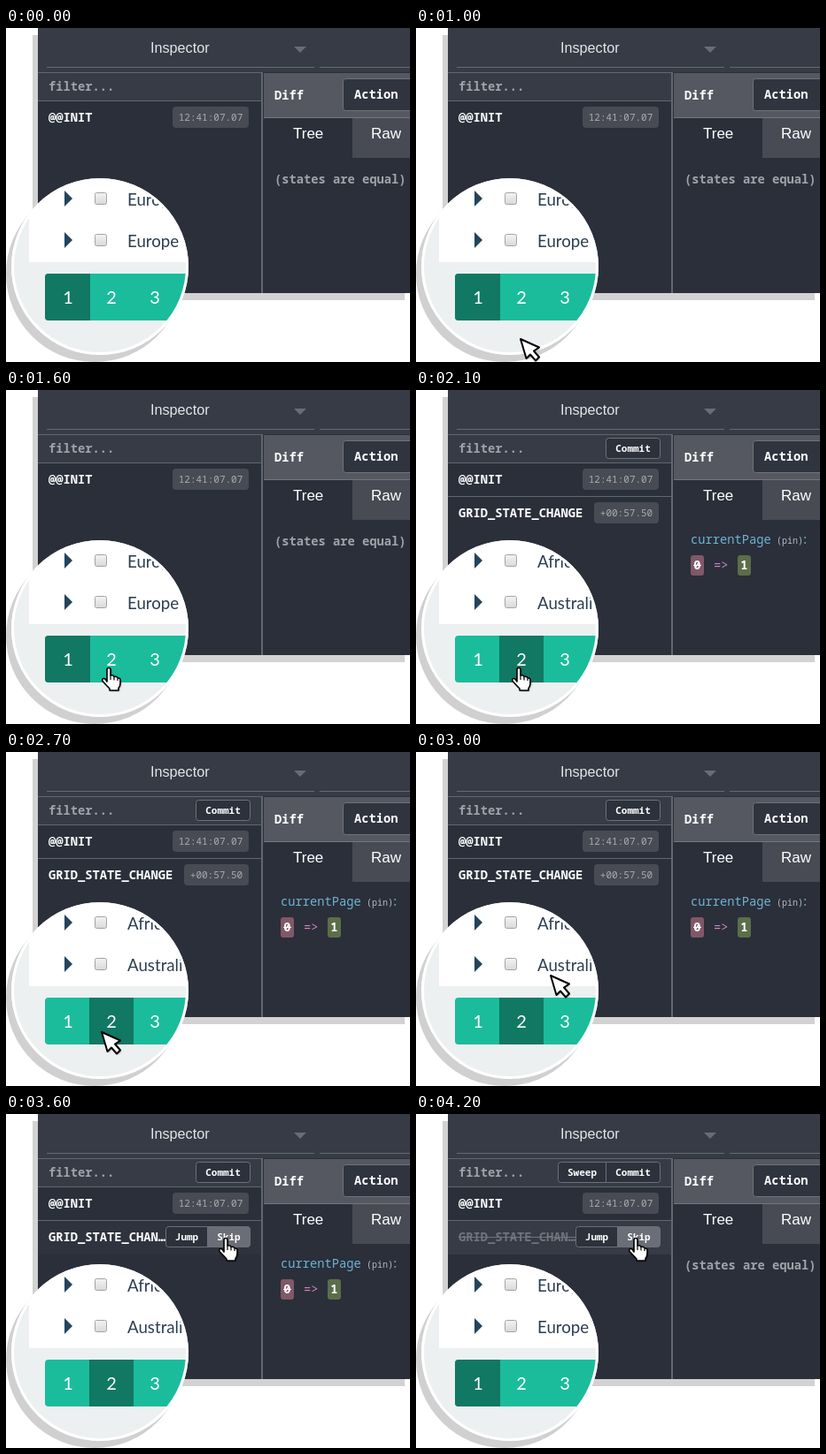
Animation, 456 px wide and 378 px high, one loop 5.2 s. Source, as an HTML page with a canvas:

```html
<!DOCTYPE html>
<html lang="en">
<head>
<meta charset="utf-8">
<title>State inspector demo</title>
<style>
  html, body { margin: 0; width: 100%; height: 100%; overflow: hidden; background: #fff; }
  canvas { display: block; }
</style>
</head>
<body>
<canvas id="stage" width="456" height="378"></canvas>
<script>
const ctx = document.getElementById('stage').getContext('2d');
const LOOP = 5200, STEP = 100;
const MONO = '"Noto Sans Mono", "DejaVu Sans Mono", monospace';
const SANS = '"Liberation Sans", Arial, sans-serif';
const LATO = 'Lato, sans-serif';
const BODY = `600 13.75px ${MONO}`;
const SMALL = `600 11px ${MONO}`;
const DARK = '#2a2f3a', HEADER = '#363b46', LINE = '#62666e', BADGE = '#484b54';

const ARROW = new Path2D('M1 1 L7.5 23 L12 18.5 L18 25.5 L22 21.5 L16 14.5 L22 10.5 Z');
const HAND = new Path2D('M7 17 V3.5 Q7 1.5 9 1.5 T11 3.5 V10 Q14 9 15 11.5 Q18 10.5 19 13 ' +
  'Q22 12.5 22 15.5 V19 Q22 22 20 24.5 V27 H10 V25 Q7 22 2 16.5 Q1 13.5 3.5 13.5 Q5 13.5 7 17 Z');
const KNUCKLES = new Path2D('M11 10 V15 M15 12 V15.5 M19 13.5 V16');

// Pointer waypoints: time, x, y
const TO_PAGER = [[1000, 117, 351], [1500, 107, 318]];
const TO_SKIP = [[2700, 107, 316], [3000, 151, 252], [3200, 186, 211], [3500, 237, 148]];

function rect(x, y, w, h, fill) {
  ctx.fillStyle = fill;
  ctx.fillRect(x, y, w, h);
}

function box(x, y, w, h, radius, fill, stroke) {
  ctx.beginPath();
  ctx.roundRect(x, y, w, h, radius);
  ctx.fillStyle = fill;
  ctx.fill();
  if (stroke) {
    ctx.strokeStyle = stroke;
    ctx.lineWidth = 1;
    ctx.stroke();
  }
}

function disc(x, y, r, fill) {
  ctx.beginPath();
  ctx.arc(x, y, r, 0, Math.PI * 2);
  ctx.fillStyle = fill;
  ctx.fill();
}

function triangle(points, fill) {
  ctx.beginPath();
  points.forEach(([x, y]) => ctx.lineTo(x, y));
  ctx.fillStyle = fill;
  ctx.fill();
}

function text(str, x, y, font, fill, align = 'left') {
  ctx.font = font;
  ctx.fillStyle = fill;
  ctx.textAlign = align;
  ctx.fillText(str, x, y);
}

function badge(str, x, y) {
  box(x, y, 274 - x, 24, 4, BADGE);
  text(str, (x + 274) / 2, y + 16, `11px ${MONO}`, '#a9abb0', 'center');
}

function button(label, x, y, w, radius, fill = '#2c313b') {
  box(x + .5, y + .5, w - 1, 23, radius, fill, '#6d7078');
  text(label, x + w / 2, y + 16, SMALL, '#fff', 'center');
}

function drawActions(s) {
  rect(36, 51, 252, 31, HEADER);
  rect(36, 50, 252, 1, LINE);
  rect(36, 82, 252, 1, LINE);
  text('filter...', 48, 71, BODY, '#a0a3a9');
  text('@@INIT', 48, 106, BODY, '#fff');
  badge('12:41:07.07', 188, 89);
  if (!s.changed) return;

  if (s.skipped) button('Sweep', 160, 54, 55, [3, 0, 0, 3]);
  button('Commit', 214, 54, 62, s.skipped ? [0, 3, 3, 0] : 3);
  if (s.rowHover) rect(36, 121, 252, 38, s.skipped ? HEADER : '#2e333e');
  rect(36, 120, 252, 1, LINE);
  const color = s.skipped ? '#70747c' : '#fff';
  text(s.rowHover ? 'GRID_STATE_CHAN…' : 'GRID_STATE_CHANGE', 48, 144, BODY, color);
  if (s.skipped) rect(48, 139, 132, 1, color);
  if (s.rowHover) {
    button('Jump', 180, 127, 48, [3, 0, 0, 3]);
    button('Skip', 227, 127, 49, [0, 3, 3, 0], s.skipHover ? '#6b6e76' : undefined);
  } else {
    badge('+00:57.50', 201, 127);
  }
}

function drawDiff(s) {
  rect(291, 51, 165, 50, '#555861');
  rect(291, 101, 165, 1, '#74777e');
  text('Diff', 303, 81, BODY, '#fff');
  box(380.5, 57.5, 90, 36, 3, '#2f343f', '#70737a');
  text('Action', 393, 80, BODY, '#fff');
  rect(391, 102, 65, 45, BADGE);
  text('Tree', 324, 125, `17px ${SANS}`, '#fff');
  text('Raw', 412, 125, `17px ${SANS}`, '#fff');

  if (!s.changed || s.skipped) {
    text('(states are equal)', 303, 176, BODY, '#a0a3a9');
    return;
  }
  const plain = `13.75px ${MONO}`;
  text('currentPage', 310, 174, plain, '#6fb3d2');
  text('(pin)', 407, 174, `10px ${MONO}`, '#b9bbc0');
  text(':', 435, 174, plain, '#6fb3d2');
  box(310, 187, 15, 23, 3, '#805867');
  text('0', 317.5, 203, BODY, '#fff', 'center');
  rect(313, 198, 9, 1, '#fff');
  text('=>', 336, 203, plain, '#d381c3');
  box(363, 187, 15, 23, 3, '#5b6e49');
  text('1', 370.5, 203, BODY, '#fff', 'center');
}

function drawPanel(s) {
  rect(30, 8, 420, 300, '#d2d2d2');
  rect(36, 0, 420, 300, DARK);
  rect(36, 0, 420, 50, HEADER);
  rect(46, 44, 302, 1, '#666a71');
  rect(354, 44, 102, 1, '#666a71');
  text('Inspector', 163, 28, `16.2px ${SANS}`, '#e4e5e7');
  triangle([[325, 21], [339, 21], [332, 28]], '#686c74');
  drawActions(s);
  drawDiff(s);
  rect(288, 50, 2, 250, LINE);
}

function drawGridRow(name, y) {
  triangle([[66, y - 9], [75, y], [66, y + 9]], '#24445c');
  const shade = ctx.createLinearGradient(0, y - 6, 0, y + 7);
  shade.addColorStop(0, '#f2f2f2');
  shade.addColorStop(1, '#d8d8d8');
  box(100.5, y - 6.5, 13, 13, 2, shade, '#a3a3a3');
  text(name, 137, y + 8, `18.7px ${LATO}`, '#2c3e50');
}

function drawLens(s) {
  const secondPage = s.changed && !s.skipped;
  disc(100, 278, 100, '#d0d0d0');
  disc(106, 270, 100, '#ecf0f1');
  ctx.save();
  ctx.beginPath();
  ctx.arc(106, 270, 99, 0, Math.PI * 2);
  ctx.clip();
  rect(26, 170, 180, 95, '#fff');
  const names = secondPage ? ['Africa', 'Australia'] : ['Europe', 'Europe'];
  names.forEach((name, i) => drawGridRow(name, 193 + i * 47));

  box(44, 278, 180, 53, 4, '#1abc9c');
  if (secondPage) rect(94, 278, 50, 53, '#107863');
  else box(44, 278, 51, 53, [4, 0, 0, 4], '#107863');
  ['1', '2', '3'].forEach((n, i) =>
    text(n, 70 + i * 49, 312, `20px ${LATO}`, '#fff', 'center'));
  ctx.restore();

  ctx.beginPath();
  ctx.arc(106, 270, 98.5, 0, Math.PI * 2);
  ctx.strokeStyle = '#fff';
  ctx.lineWidth = 3;
  ctx.stroke();
}

function along(path, t) {
  const i = Math.max(1, path.findIndex(p => p[0] >= t));
  const [t0, x0, y0] = path[i - 1], [t1, x1, y1] = path[i];
  const k = (t - t0) / (t1 - t0);
  return [x0 + (x1 - x0) * k, y0 + (y1 - y0) * k];
}

function drawPointer(shape, [x, y], details) {
  ctx.save();
  ctx.translate(Math.round(x), Math.round(y));
  ctx.lineJoin = 'round';
  ctx.save();
  ctx.shadowColor = 'rgba(0,0,0,.4)';
  ctx.shadowBlur = 2;
  ctx.shadowOffsetX = ctx.shadowOffsetY = 1;
  ctx.fillStyle = '#fff';
  ctx.fill(shape);
  ctx.restore();
  ctx.strokeStyle = '#000';
  ctx.lineWidth = details ? 1.6 : 2;
  ctx.stroke(shape);
  if (details) {
    ctx.lineWidth = 1.2;
    ctx.stroke(details);
  }
  ctx.restore();
}

function drawCursor(t) {
  if (t < 1000) return;
  if (t < 1600) drawPointer(ARROW, along(TO_PAGER, t));
  else if (t < 2700) drawPointer(HAND, [107, 313], KNUCKLES);
  else if (t < 3600) drawPointer(ARROW, along(TO_SKIP, t));
  else drawPointer(HAND, [239, 139], KNUCKLES);
}

function render(now) {
  const t = Math.floor(now % LOOP / STEP) * STEP;
  const state = {
    changed: t >= 2100,
    rowHover: t >= 3500,
    skipHover: t >= 3600,
    skipped: t >= 4100
  };
  rect(0, 0, 456, 378, '#fff');
  drawPanel(state);
  drawLens(state);
  drawCursor(t);
}

const start = performance.now();
function tick() {
  render(performance.now() - start);
  requestAnimationFrame(tick);
}
tick();
</script>
</body>
</html>
```
